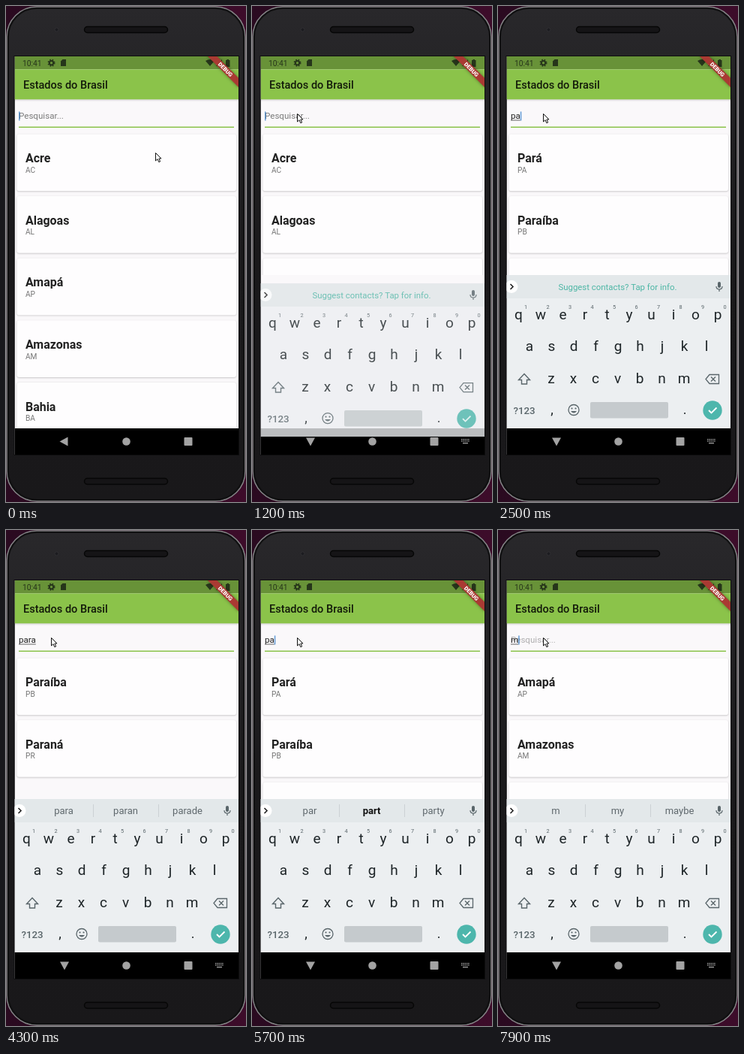
An HTML page with a canvas for the animation above (8 s loop, 320 by 660 pixels).

```html
<!DOCTYPE html>
<html lang="pt-BR">
<head>
<meta charset="utf-8">
<title>Estados do Brasil</title>
<style>
html, body { margin: 0; width: 320px; height: 660px; overflow: hidden; background: #2a0a20; }
canvas { display: block; }
</style>
</head>
<body>
<canvas id="stage" width="320" height="660"></canvas>
<script>
const ctx = document.getElementById('stage').getContext('2d');
const LOOP = 8000, STEP = 100, KEYS_TOP = 358, NAV_TOP = 562, ROW = 82.6;
const LEFT = 11.5, WIDTH = 298.5;

const states = ('Acre AC,Alagoas AL,Amapá AP,Amazonas AM,Bahia BA,Ceará CE,Distrito Federal DF,' +
  'Espírito Santo ES,Goiás GO,Maranhão MA,Mato Grosso MT,Mato Grosso do Sul MS,Minas Gerais MG,' +
  'Pará PA,Paraíba PB,Paraná PR,Pernambuco PE,Piauí PI,Rio de Janeiro RJ,Rio Grande do Norte RN,' +
  'Rio Grande do Sul RS,Rondônia RO,Roraima RR,Santa Catarina SC,São Paulo SP,Sergipe SE,Tocantins TO')
  .split(',').map(s => [s.slice(0, -3), s.slice(-2)]);

// [start time, value]
const typing = [[0, ''], [2000, 'p'], [2300, 'pa'], [3300, 'par'], [3800, 'para'],
  [4500, 'par'], [5200, 'pa'], [5900, 'p'], [6400, ''], [7800, 'm']];
const hints = [[0, 'Suggest contacts? Tap for info.'], [3000, 'par part* party'], [3500, 'par para part'],
  [3900, 'para paran parade'], [4700, 'par para part'], [5400, 'par part* party'],
  [6100, 'p please pls'], [6500, ''], [7900, 'm my maybe']];
const mousePath = [[0, 199, 195], [200, 124, 164], [300, 124, 164], [600, 60, 143]];
const caretToggles = [500, 800, 1700, 2000, 3000, 3300, 4300, 4500, 5000, 5200, 7000, 7500];

const clamp = v => Math.max(0, Math.min(1, v));
const current = (track, t) => track.filter(e => e[0] <= t).pop();

function rect(x, y, w, h, color) {
  ctx.fillStyle = color;
  ctx.fillRect(x, y, w, h);
}
function shape(fill, stroke, width = 1) {
  if (fill) { ctx.fillStyle = fill; ctx.fill(); }
  if (stroke) { ctx.strokeStyle = stroke; ctx.lineWidth = width; ctx.stroke(); }
}
function round(x, y, w, h, r, fill, stroke, width) {
  ctx.beginPath();
  ctx.roundRect(x, y, w, h, r);
  shape(fill, stroke, width);
}
function circle(x, y, r, fill, stroke, width) {
  ctx.beginPath();
  ctx.arc(x, y, r, 0, 7);
  shape(fill, stroke, width);
}
function path(x, y, d, fill, stroke, width) {
  ctx.save();
  ctx.translate(x, y);
  const p = new Path2D(d);
  if (fill) { ctx.fillStyle = fill; ctx.fill(p); }
  if (stroke) { ctx.strokeStyle = stroke; ctx.lineWidth = width || 1; ctx.stroke(p); }
  ctx.restore();
}
function text(str, x, y, size, color, weight = 400, align = 'left') {
  ctx.font = `${weight} ${size}px Roboto, sans-serif`;
  ctx.textAlign = align;
  ctx.fillStyle = color;
  ctx.fillText(str, x, y);
}
function gradient(x0, y0, x1, y1, ...colors) {
  const g = ctx.createLinearGradient(x0, y0, x1, y1);
  colors.forEach((c, i) => g.addColorStop(i / (colors.length - 1), c));
  return g;
}

function phone() {
  rect(0, 0, 320, 660, gradient(0, 0, 320, 0, '#2a0a20', '#3d0c2a'));
  round(1, 1, 318, 658, 40, gradient(0, 0, 0, 660, '#29282b', '#1a191b', '#19181a'), '#858587', 1.5);
  round(3, 3, 314, 654, 38, null, '#101011', 2);
  for (const y of [27, 628]) round(104.5, y + .5, 111, 8, 4, '#151416', '#060606', 1.5);
  circle(67.5, 31.5, 2.5, '#1c1c20', '#302f33');
  rect(10.5, 66, 300.5, 532, '#0d0d0e');
}

function appBar() {
  rect(LEFT, 67, WIDTH, 17.4, '#689238');
  rect(LEFT, 84.4, WIDTH, 39.9, '#8bc34a');
  rect(LEFT, 124.3, WIDTH, 3, gradient(0, 124, 0, 127.3, 'rgba(0,0,0,.14)', 'rgba(0,0,0,0)'));
  const ink = '#26351a';
  text('10:41', 22, 79.5, 10.3, ink);
  circle(60.5, 75.7, 2.7, null, ink, 2);
  ctx.setLineDash([1.6, 1.8]);
  circle(60.5, 75.7, 4.2, null, ink, 1.6);
  ctx.setLineDash([]);
  path(73, 71, 'M2.5 0H7V9H0V2.5Z', ink);
  path(272, 80, 'M0 0L-6 -7Q0 -11 6 -7Z', ink);
  path(280, 80, 'M0 0H8V-9Z', ink);
  rect(293, 72, 5.5, 9, ink);
  rect(294.5, 71, 2.5, 1, ink);
  text('Estados do Brasil', 23, 109.7, 14.5, 'rgba(0,0,0,.87)', 500);
}

function banner() {
  ctx.save();
  ctx.translate(LEFT + WIDTH, 67);
  ctx.rotate(Math.PI / 4);
  ctx.shadowColor = 'rgba(0,0,0,.4)';
  ctx.shadowBlur = 4;
  rect(-29, 20.3, 58, 8.7, '#aa3a33');
  ctx.shadowBlur = 0;
  text('DEBUG', 0, 27.3, 7.4, '#fff', 900, 'center');
  ctx.restore();
}

function searchField(t) {
  const [since, typed] = current(typing, t);
  const before = current(typing, since - 1);
  const fade = clamp((t - since) / 250);
  ctx.globalAlpha = !before ? 1 : !typed ? fade : !before[1] ? 1 - fade : 0;
  text('Pesquisar...', 17, 150, 11.6, '#7b7b7b');
  ctx.globalAlpha = 1;
  text(typed, 17, 150, 11.6, '#212121');
  const width = ctx.measureText(typed).width;
  if (typed) rect(17, 151.5, width, 1, '#666');
  if (caretToggles.filter(c => c <= t).length % 2 === 0)
    rect(17 + width, 140.5, 1.5, 12, 'rgba(50,125,200,.75)');
  rect(17, 160.5, 287, 1.5, '#8bc34a');
  return typed;
}

function cards(query, bottom) {
  ctx.save();
  ctx.beginPath();
  ctx.rect(LEFT, 164, WIDTH, bottom - 164);
  ctx.clip();
  states.filter(s => s[0].toLowerCase().includes(query)).slice(0, 5).forEach(([name, code], i) => {
    const y = 170.5 + i * ROW;
    ctx.shadowColor = 'rgba(0,0,0,.24)';
    ctx.shadowBlur = 2;
    ctx.shadowOffsetY = .7;
    round(14.5, y, 292.5, 75.7, 3, '#fefdfe');
    ctx.shadowColor = 'transparent';
    text(name, 26, y + 37.7, 15.95, '#212121', 700);
    text(code, 26, y + 51.3, 10.15, '#757575');
  });
  ctx.restore();
}

function navBar(keysOpen) {
  const grey = '#a3a3a3';
  rect(LEFT, NAV_TOP, WIDTH, 35, '#000');
  if (keysOpen) {
    path(78, 579.5, 'M-6 -5H6L0 6Z', grey);
    for (let i = 0; i < 10; i++) rect(279 + i % 5 * 2.3, 576 + (i / 5 | 0) * 2.3, 1.4, 1.4, grey);
    rect(281, 581, 7, 1.3, grey);
  } else path(77, 579.5, 'M5.5 -6V6L-5.5 0Z', grey);
  circle(160.5, 579.5, 5.3, grey);
  round(237.5, 574, 11, 11, 1, grey);
}

function suggestions(t) {
  const line = current(hints, t)[1], y = 378;
  if (line.includes('?')) text(line, 159.5, y, 11.4, '#4db6a5', 400, 'center');
  else if (line) {
    line.split(' ').forEach((word, i) => {
      const bold = word.endsWith('*');
      text(word.replace('*', ''), 77 + i * 82.5, y, 13, bold ? '#111' : '#5f686d', bold ? 700 : 400, 'center');
    });
    for (const x of [116, 203]) rect(x, 365, 1, 17, '#ccd1d4');
  }
}

function keyboard(t) {
  const ink = '#1d2427', soft = '#59656a';
  rect(LEFT, KEYS_TOP, WIDTH, 204, '#eceff1');
  rect(LEFT, KEYS_TOP, WIDTH, 31, '#e3e8ea');
  suggestions(t);
  circle(18, 373.5, 8.5, '#fff');
  path(16.5, 373.5, 'M0 -3.5L3.5 0L0 3.5', null, '#222', 1.6);
  round(293, 367, 4, 8, 2, soft);
  path(295, 373, 'M-4 0Q-4 4 0 4Q4 4 4 0M0 4V7', null, soft, 1.2);

  ['qwertyuiop', 'asdfghjkl', 'zxcvbnm'].forEach((row, r) => [...row].forEach((key, i) => {
    const x = [27.5, 42, 71][r] + i * 29.5;
    text(key, x, 416.5 + r * 42.5, 19, ink, 400, 'center');
    if (r === 0) text((i + 1) % 10, x + 9.5, 402.5, 7.3, soft, 400, 'center');
  }));
  path(35, 496.5, 'M0 -7L7.5 1H3.5V6.5H-3.5V1H-7.5Z', null, soft, 1.4);
  path(286, 496.5, 'M-9 0L-4 -6H8.5V6H-4ZM-2 -3L4 3M4 -3L-2 3', null, soft, 1.3);

  text('?123', 35, 542.5, 13.3, soft, 500, 'center');
  text(',', 72, 542.5, 18, ink, 400, 'center');
  text('.', 249, 542.5, 18, ink, 400, 'center');
  circle(101, 537.5, 7, null, soft, 1.3);
  circle(98.5, 535.5, 1.1, soft);
  circle(103.5, 535.5, 1.1, soft);
  path(101, 539, 'M-4 0Q0 5 4 0Z', soft);
  round(123, 527, 104, 21.5, 2, '#c5cacd');
  circle(286, 538, 12.7, '#4db6ac');
  path(286, 538, 'M-5 0L-1.5 3.5L5.5 -3.5', null, '#fff', 1.8);
}

function mouse(t) {
  const a = current(mousePath, t);
  const b = mousePath.find(p => p[0] > t) || a;
  const k = b === a ? 0 : (t - a[0]) / (b[0] - a[0]);
  path(a[1] + (b[1] - a[1]) * k, a[2] + (b[2] - a[2]) * k,
    'M.5 .5V11L3 8.7L4.8 12.7L6.6 12L4.9 8H8Z', '#fff', '#111', 1);
}

function draw(t) {
  phone();
  ctx.save();
  ctx.beginPath();
  ctx.rect(LEFT, 67, WIDTH, 530);
  ctx.clip();
  rect(LEFT, 67, WIDTH, 530, '#faf8fa');
  appBar();
  const query = searchField(t);
  cards(query, t < 900 ? NAV_TOP : KEYS_TOP);
  banner();
  navBar(t >= 1000);
  const slide = clamp((t - 950) / 520);
  if (slide > 0) {
    ctx.globalAlpha = clamp(slide * 1.65);
    ctx.translate(0, 41 * (1 - slide) ** 2);
    keyboard(t);
  }
  ctx.restore();
  mouse(t);
}

function tick(now) {
  draw(Math.floor(now % LOOP / STEP) * STEP);
  requestAnimationFrame(tick);
}
requestAnimationFrame(tick);
</script>
</body>
</html>
```
